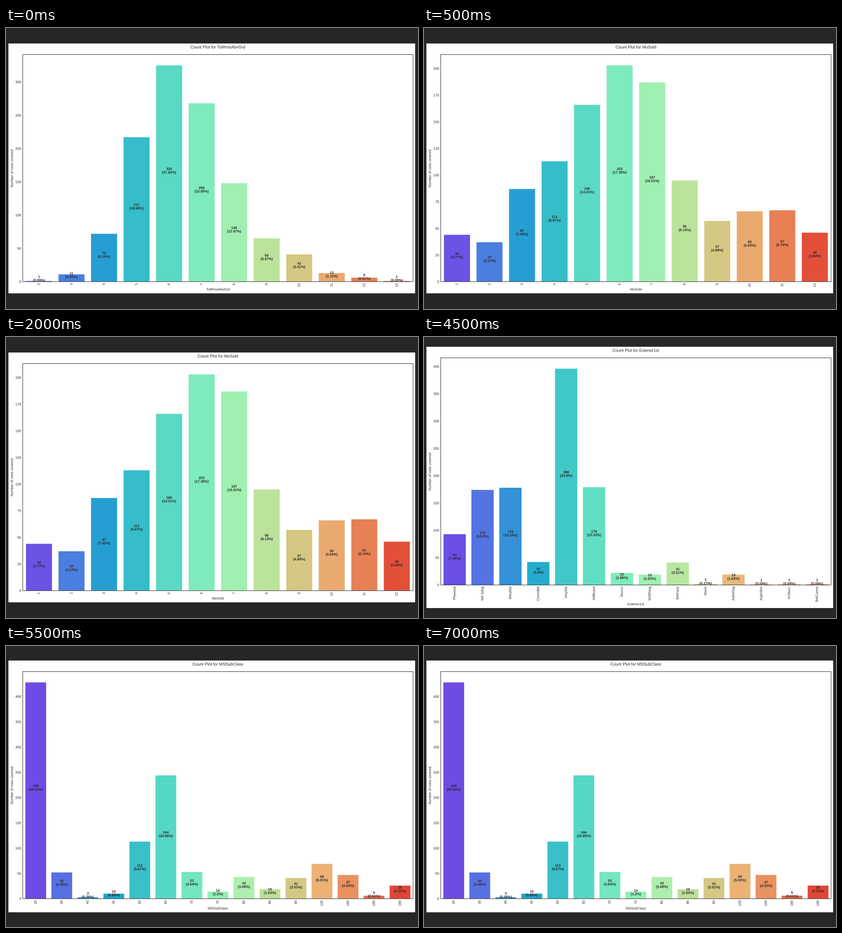
These frames come from a looping animation (904 by 619 pixels, 8000 ms). A matplotlib script:

```python
import colorsys

import matplotlib.pyplot as plt
from matplotlib.animation import FuncAnimation
from matplotlib.patches import PathPatch, Rectangle
from matplotlib.textpath import TextPath
from matplotlib.ticker import MaxNLocator
from matplotlib.transforms import Affine2D

W, H = 904, 619
DARK = "#262626"
PANEL_X = (5.3, 897.7)
LEFT, RIGHT = 36.7, 893.2
PLOT_H = 500.3
CENTER_Y = 309.3
ABOVE, BELOW = 24.4, 18
SIZE, TITLE_SIZE = 7.65, 9.15
LOCATOR = MaxNLocator(9, steps=[1, 2, 2.5, 5, 10])

# column, categories, rows counted in each
CHARTS = [
    ("TotRmsAbvGrd", [*range(2, 13), 14],
     [1, 11, 72, 217, 325, 268, 148, 65, 41, 13, 6, 1]),
    ("MoSold", range(1, 13),
     [44, 37, 87, 113, 166, 203, 187, 95, 57, 66, 67, 46]),
    ("Exterior1st",
     ["Plywood", "Wd Sdng", "MetalSd", "CemntBd", "VinylSd", "HdBoard",
      "Stucco", "WdShing", "BrkFace", "Stone", "AsbShng", "AsphShn",
      "ImStucc", "BrkComm"],
     [93, 174, 178, 42, 396, 179, 22, 19, 41, 2, 19, 1, 1, 1]),
    ("MSSubClass",
     sorted([*range(20, 100, 10), 45, 75, 85, 120, 160, 180, 190]),
     [428, 52, 3, 10, 113, 244, 53, 14, 43, 19, 41, 69, 47, 6, 26]),
]

# dpi 72 makes one point equal one pixel
fig = plt.figure(figsize=(W / 72, H / 72), dpi=72, facecolor=DARK)
ax = fig.add_axes([0, 0, 1, 1])
ax.set_xlim(0, W)
ax.set_ylim(H, 0)
ax.axis("off")


def bar_color(i, n):
    """Rainbow colour with its saturation cut to three quarters."""
    rgb = plt.get_cmap("rainbow")((i + 1) / (n + 1))[:3]
    h, l, s = colorsys.rgb_to_hls(*rgb)
    return colorsys.hls_to_rgb(h, l, s * 0.75)


def outline(s, size=SIZE, weight="normal"):
    return TextPath((0, 0), s, size=size,
                    prop={"family": "Liberation Sans", "weight": weight})


def write(x, y, s, size=SIZE, weight="normal", align=0.5, angle=0):
    """Text as outlines, so that it can sit between whole pixels."""
    path = outline(s, size, weight)
    ink = path.get_extents()
    place = (Affine2D().translate(-ink.x0 - align * ink.width, 0)
             .rotate_deg(angle).scale(1, -1).translate(x, y))
    return ax.add_patch(PathPatch(place.transform_path(path), fc=DARK, lw=0,
                                  snap=False, zorder=4))


def box(x0, y0, x1, y1, **kw):
    return ax.add_patch(Rectangle((x0, y0), x1 - x0, y1 - y0,
                                  snap=False, **kw))


def build(name, labels, counts):
    labels = [str(label) for label in labels]
    n, total = len(counts), sum(counts)
    slot = (RIGHT - LEFT) / n
    limit = max(counts) * 1.05
    mid_x = (LEFT + RIGHT) / 2

    # the panel grows with its longest category and stays centred
    longest = max(outline(label).get_extents().width for label in labels)
    panel_h = ABOVE + PLOT_H + BELOW + longest
    panel_top = CENTER_Y - panel_h / 2
    top = panel_top + ABOVE
    bottom = top + PLOT_H

    def y_of(value):
        return bottom - PLOT_H * value / limit

    parts = [
        box(PANEL_X[0], panel_top, PANEL_X[1], panel_top + panel_h,
            fc="white", lw=0, zorder=1),
        box(LEFT, top, RIGHT, bottom, fill=False, ec=DARK, lw=1, zorder=3),
        write(mid_x, top - 13.4, f"Count Plot for {name}", TITLE_SIZE),
        write(mid_x, bottom + 11.8 + longest, name),
        write(15.4, (top + bottom) / 2 + 0.5, "Number of rows covered",
              angle=90),
    ]
    for value in LOCATOR.tick_values(0, limit):
        if value <= limit:
            parts.append(write(33, y_of(value) + 2.7, f"{value:.0f}", align=1))

    for i, (label, count) in enumerate(zip(labels, counts)):
        x = LEFT + (i + 0.5) * slot
        mid_y = y_of(count / 2)
        share = round(100 * count / total, 2)
        parts += [
            box(x - 0.4 * slot, y_of(count), x + 0.4 * slot, bottom,
                fc=bar_color(i, n), lw=0, zorder=2),
            write(x, mid_y - 7.7, str(count), weight="bold"),
            write(x, mid_y, f"({share}%)", weight="bold"),
            write(x + 1.9, bottom + 3.8, label, align=1, angle=90),
        ]
    return parts


scenes = [build(*chart) for chart in CHARTS]


def update(frame):
    # the first chart holds for one step, the others for five
    current = (frame + 4) // 5
    for i, parts in enumerate(scenes):
        for part in parts:
            part.set_visible(i == current)
    return []


anim = FuncAnimation(fig, update, frames=16, interval=500,
                     repeat=True, repeat_delay=0, blit=False)
plt.show()
```
